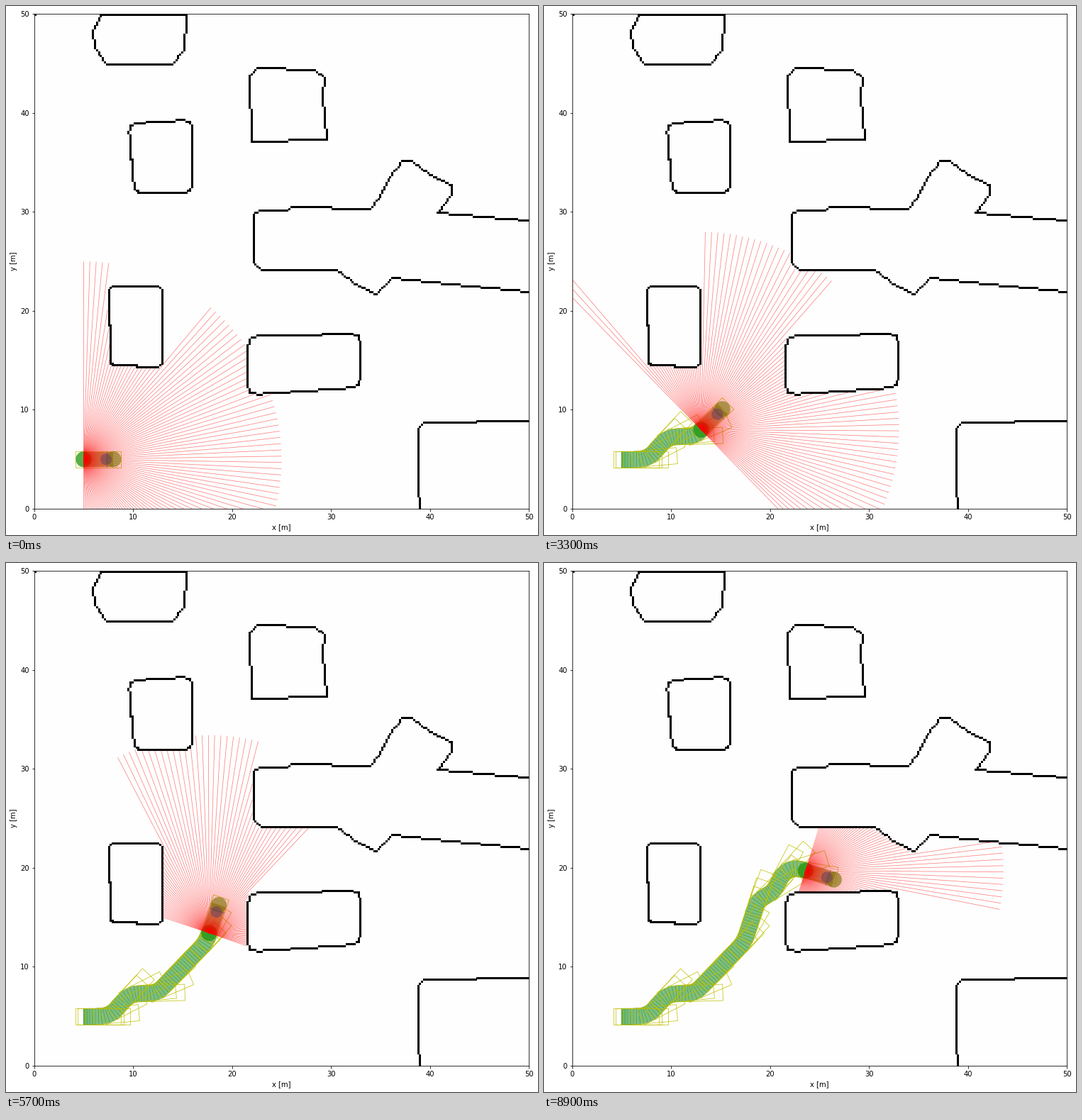
Write a matplotlib script that moves like this. It is 750 px wide and 746 px high and loops after 9 s.

```python
import numpy as np
import matplotlib.pyplot as plt
from matplotlib.animation import FuncAnimation
from matplotlib.collections import LineCollection, PolyCollection
from matplotlib.patches import Polygon

W, H, DPI = 750, 746, 100
PX = 72 / DPI                        # one pixel in points
FRAMES, INTERVAL = 90, 100
SIZE, CELL = 50.0, 0.2003            # map side and grid cell in metres
CELLS = 250
RANGE, RAYS = 20.0, 100
REAR, FRONT, HALF = -0.8, 3.8, 0.82  # car body around the rear axle
SPEED, RAMP = 0.3, 6                 # metres per frame, frames to reach it
BOX_STEP = 3                         # frames between body outlines

plt.rcParams.update({
    "font.family": "DejaVu Sans", "font.size": 10 * PX,
    "axes.linewidth": 0.8 * PX, "axes.labelpad": 4 * PX,
    "xtick.major.size": 3.5 * PX, "ytick.major.size": 3.5 * PX,
    "xtick.major.width": 0.8 * PX, "ytick.major.width": 0.8 * PX,
    "xtick.major.pad": 3.5 * PX, "ytick.major.pad": 3.5 * PX,
})

# ---- map -------------------------------------------------------------
grid = np.zeros((CELLS, CELLS), bool)


def outline(points, closed=True):
    """Mark the cells along a polyline of (column, row) corners."""
    pts = np.asarray(points, float)
    if closed:
        pts = np.vstack([pts, pts[:1]])
    for a, b in zip(pts[:-1], pts[1:]):
        n = int(np.ceil(np.abs(b - a).max())) + 1
        col, row = np.rint(np.linspace(a, b, n)).astype(int).T
        grid[row, col] = True


def rounded(corners, cut):
    """Outline a polygon with its corners rounded off."""
    pts = np.asarray(corners, float)
    out = []
    for prev, c, nxt in zip(np.roll(pts, 1, 0), pts, np.roll(pts, -1, 0)):
        a = c + cut * (prev - c) / np.linalg.norm(prev - c)
        b = c + cut * (nxt - c) / np.linalg.norm(nxt - c)
        out += [a, (a + 2 * c + b) / 4, b]
    outline(out)


rounded([(50, 159), (79, 159), (79, 196), (47, 194)], 4)
rounded([(38, 72), (64, 71), (64, 112), (37, 112)], 3)
rounded([(107, 57), (164, 61), (164, 88), (107, 86.5)], 5)
outline([(33, 249), (29, 240), (30, 232), (36, 224), (69, 224), (75, 231),
         (76, 249)])
outline([(109, 185), (147, 186), (145, 208), (146, 217), (141, 221),
         (112, 222), (108, 218)])
outline([(249, 145), (203, 149), (210, 158), (210, 163), (199, 168),
         (190, 175), (185, 175), (179, 167), (173, 156), (169, 151),
         (129, 152), (127, 150), (113, 150), (110, 148), (110, 124),
         (114, 120), (152, 120), (163, 112), (172, 108), (180, 116),
         (249, 109)], closed=False)
outline([(194, 0), (193, 10), (193, 40), (196, 43), (249, 44)], closed=False)
grid[249, 0] = True

# Close diagonal gaps so that no ray slips through.
solid = grid.copy()
solid[1:, :-1] |= grid[:-1, :-1] & grid[1:, 1:]
solid[:-1, :-1] |= grid[1:, :-1] & grid[:-1, 1:]

# ---- drive -----------------------------------------------------------
# Turning points of the heading: frame, degrees
TURNS = np.array([(7, 0), (16.5, 50), (26, 0), (34, 46), (49.5, 46),
                  (58, 72), (65, 72), (71.5, 31), (77.5, 63), (89.5, -18)])


def heading(f):
    """Heading in radians, eased between turning points."""
    t, deg = TURNS.T
    k = np.clip(np.searchsorted(t, f, side="right") - 1, 0, len(t) - 2)
    u = np.clip((f - t[k]) / (t[k + 1] - t[k]), 0, 1)
    return np.radians(deg[k] + (deg[k + 1] - deg[k])
                      * (1 - np.cos(np.pi * u)) / 2)


def drive():
    """Integrate speed along the heading: x, y, heading per frame."""
    f = np.arange(FRAMES)
    mid = f[:-1] + 0.5
    step = SPEED * np.minimum(1, mid / RAMP)
    a = heading(mid)
    x = 5 + np.r_[0, np.cumsum(step * np.cos(a))]
    y = 5 + np.r_[0, np.cumsum(step * np.sin(a))]
    return np.column_stack([x, y, heading(f)])


def place(pose, pts):
    """Move points from the car's frame into the world."""
    x, y, a = pose
    c, s = np.cos(a), np.sin(a)
    return np.asarray(pts) @ np.array([[c, s], [-s, c]]) + (x, y)


def rect(x0, x1, half):
    return [(x0, -half), (x1, -half), (x1, half), (x0, half)]


def disc(x, r):
    a = np.linspace(0, 2 * np.pi, 40)
    return np.column_stack([x + r * np.cos(a), r * np.sin(a)])


def scan(pose):
    """Ray segments from the car to the first wall or full range."""
    x, y, a = pose
    ang = a + np.linspace(-np.pi / 2, np.pi / 2, RAYS)
    ux, uy = np.cos(ang)[:, None], np.sin(ang)[:, None]
    r = np.arange(0, RANGE + 0.01, 0.05)
    col = np.clip(((x + ux * r) / CELL).astype(int), 0, CELLS - 1)
    row = np.clip(((y + uy * r) / CELL).astype(int), 0, CELLS - 1)
    hit = solid[row, col]
    dist = np.where(hit.any(axis=1), r[hit.argmax(axis=1)], RANGE)
    ends = np.column_stack([x + ux[:, 0] * dist, y + uy[:, 0] * dist])
    return np.stack([np.broadcast_to((x, y), ends.shape), ends], axis=1)


poses = drive()
boxes = [place(p, rect(REAR, FRONT, HALF)) for p in poses[::BOX_STEP]]
sides = [place(p, [(0, HALF), (0, -HALF)]) for p in poses]
slabs = [np.vstack([a, b[::-1]]) for a, b in zip(sides, sides[1:])]

# ---- figure ----------------------------------------------------------
fig = plt.figure(figsize=(W / DPI, H / DPI), dpi=DPI, facecolor="white")
ax = fig.add_axes([39.7 / W, 37 / H, 697.7 / W, 697.7 / H],
                  facecolor="#fefefe")
ax.set(xlim=(0, SIZE), ylim=(0, SIZE), xlabel="x [m]", ylabel="y [m]",
       xticks=range(0, 51, 10), yticks=range(0, 51, 10))
rows, cols = np.nonzero(grid)
ax.plot((cols + 0.5) * CELL, (rows + 0.5) * CELL, "ks", ms=3 * PX, mew=0,
        zorder=0)

band = ax.add_collection(PolyCollection(
    [], facecolors=(0, 0.5, 0, 0.5), edgecolors=(0, 0.5, 0, 0.5),
    linewidths=0.4 * PX, zorder=1))
trail = ax.add_collection(PolyCollection(
    [], facecolors="none", edgecolors="y", linewidths=0.7 * PX, zorder=2))
rays = ax.add_collection(LineCollection(
    [], colors="red", alpha=0.5, linewidths=0.75 * PX, zorder=4))

# local shape, colour, alpha, layer (rays lie on layer 4)
PARTS = [
    (rect(0, 3, 0.75), (0.55, 0.52, 0.10), 0.65, 3.0),
    (disc(0, 0.8), (0.12, 0.58, 0.05), 0.75, 3.1),
    (disc(3, 0.8), (0.50, 0.47, 0.05), 0.65, 5.0),
    (disc(2.26, 0.58), (0.45, 0.25, 0.38), 0.60, 5.1),
    (rect(2.35, 2.43, HALF), (0.35, 0.25, 0.25), 0.50, 5.2),
]
car = [ax.add_patch(Polygon(pts, fc=color, ec="none", alpha=alpha, zorder=z))
       for pts, color, alpha, z in PARTS]


def update(i):
    band.set_verts(slabs[:i])
    trail.set_verts(boxes[:i // BOX_STEP + 1])
    rays.set_segments(scan(poses[i]))
    for patch, (pts, *_) in zip(car, PARTS):
        patch.set_xy(place(poses[i], pts))
    return [band, trail, rays, *car]


anim = FuncAnimation(fig, update, frames=FRAMES, interval=INTERVAL,
                     repeat=True, repeat_delay=0, blit=False)
plt.show()
```
